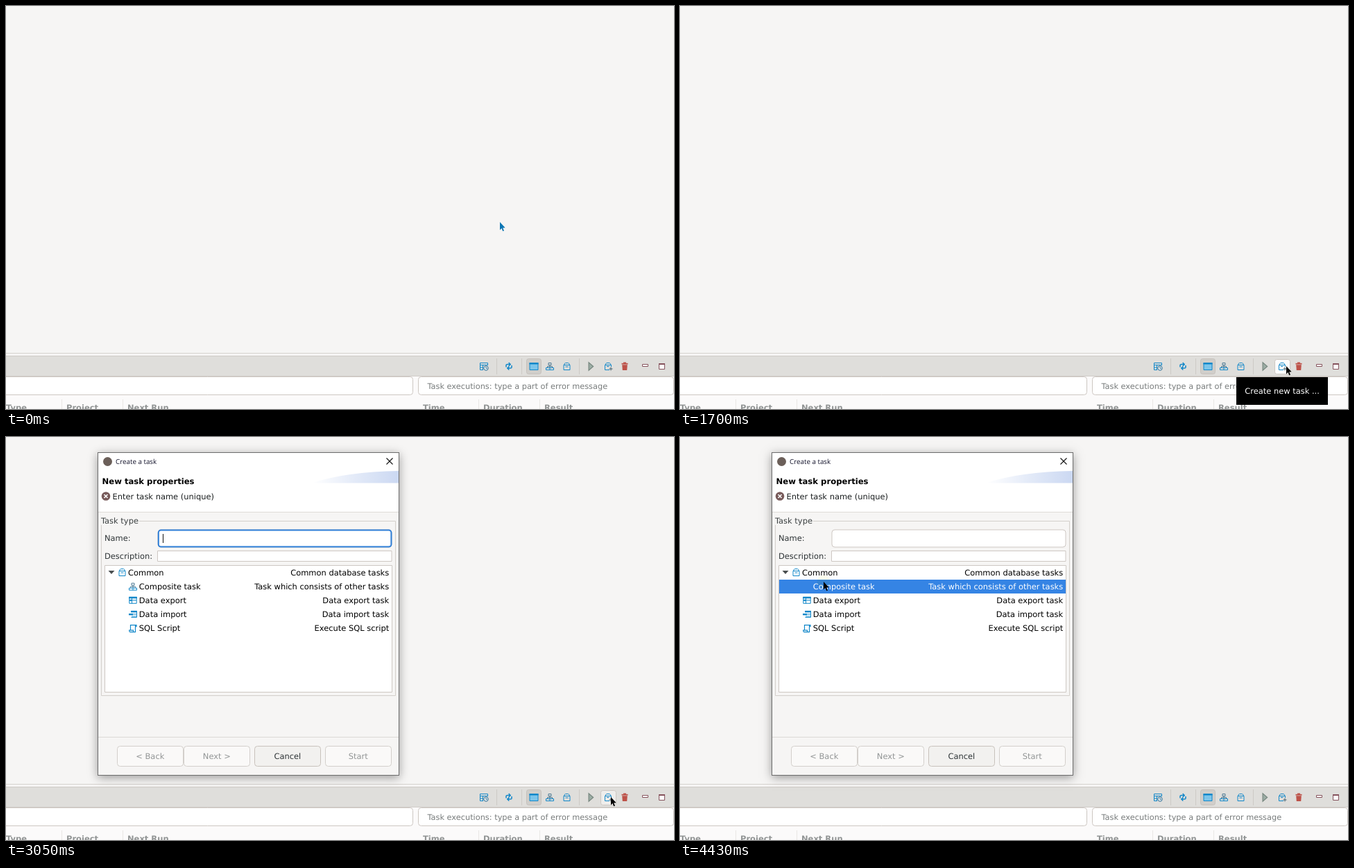
An HTML page with a canvas that plays this animation: 963 px wide and 582 px high, repeating every 5770 ms.

```html
<!DOCTYPE html>
<html lang="en">
<head>
<meta charset="utf-8">
<title>Create a task</title>
<style>
html, body { margin: 0; width: 100%; height: 100%; overflow: hidden; background: #f6f5f4; }
canvas { display: block; }
</style>
</head>
<body>
<canvas id="stage" width="963" height="582"></canvas>
<script>
const ctx = document.getElementById('stage').getContext('2d');
const LOOP = 5770;
const BG = '#f6f5f4', EDGE = '#cdc7c2', INK = '#1b1f20', DIM = '#929595';
const BLUE = '#1187c9', ACCENT = '#3584e4', MAROON = '#85525c';
const SANS = '"DejaVu Sans", sans-serif';

// Pointer path: time, x, y
const PATH = [
  [365, 712, 312], [410, 715, 315], [500, 752, 360], [590, 802, 422], [680, 840, 467],
  [770, 857, 488], [860, 867, 501], [950, 873, 510], [1000, 873, 511], [1200, 873, 516],
  [1460, 874, 520], [2340, 874, 520], [2390, 872, 520], [3140, 872, 520], [3190, 861, 496],
  [3230, 829, 446], [3280, 735, 372], [3325, 560, 300], [3370, 370, 252], [3415, 200, 226],
  [3460, 70, 212], [3505, 5, 208], [3550, -3, 207], [3595, 12, 210], [3640, 48, 216],
  [3685, 95, 222], [3730, 140, 225], [3775, 172, 226], [3820, 190, 226], [3920, 193, 223],
  [4050, 206, 211], [4250, 207, 209]
];

const clamp = v => Math.max(0, Math.min(1, v));
const ramp = (t, from, to) => clamp((t - from) / (to - from));

function pointerAt(t) {
  for (const [from, to] of [[410, 950], [3280, 3820]])
    if (t >= from && t < to) t = from + Math.floor((t - from + 1) / 45) * 45;
  const i = PATH.findIndex(p => p[0] > t);
  if (i === 0) return PATH[0].slice(1);
  if (i < 0) return PATH[PATH.length - 1].slice(1);
  const [a, b] = [PATH[i - 1], PATH[i]];
  const k = ramp(t, a[0], b[0]);
  return [a[1] + (b[1] - a[1]) * k, a[2] + (b[2] - a[2]) * k];
}

function rect(x, y, w, h, color) {
  ctx.fillStyle = color;
  ctx.fillRect(x, y, w, h);
}

function box(x, y, w, h, r, fill, stroke, width = 1) {
  ctx.beginPath();
  ctx.roundRect(x, y, w, h, r);
  if (fill) { ctx.fillStyle = fill; ctx.fill(); }
  if (stroke) { ctx.strokeStyle = stroke; ctx.lineWidth = width; ctx.stroke(); }
}

function poly(points, fill) {
  ctx.beginPath();
  points.forEach(([x, y]) => ctx.lineTo(x, y));
  ctx.closePath();
  ctx.fillStyle = fill;
  ctx.fill();
}

function path(d, stroke, width = 1) {
  ctx.strokeStyle = stroke;
  ctx.lineWidth = width;
  ctx.stroke(new Path2D(d));
}

function disc(x, y, r, color) {
  ctx.beginPath();
  ctx.arc(x, y, r, 0, Math.PI * 2);
  ctx.fillStyle = color;
  ctx.fill();
}

function text(s, x, y, color = INK, font = '11.46px ' + SANS, align = 'left') {
  ctx.font = font;
  ctx.textAlign = align;
  ctx.fillStyle = color;
  ctx.fillText(s, x, y);
}

function at(x, y, draw) {
  ctx.save();
  ctx.translate(x, y);
  draw();
  ctx.restore();
}

// Icons are drawn in a 12 px cell
const icons = {
  bag() {
    path('M1.5 4.5H10.5V11.5H1.5ZM2 4L3.5 1.5M10 4L8.5 1.5', BLUE);
    path('M4 1.5H8M4 7H8', BLUE);
  },
  bagPlus() {
    path('M8 11.5H1.5V4.5H10.5V7M2 4L3.5 1.5M10 4L8.5 1.5M4 1.5H8M4 6.5H7.5', BLUE);
    path('M7.5 10H12.5M10 7.5V12.5', '#45606e');
  },
  tree() {
    path('M4 1.5H8V4.5H4ZM6 5V8M2.5 8V6.5H9.5V8', '#4b7893');
    path('M.5 8.5H11.5V11.5H.5ZM6 8.5V11.5', BLUE);
  },
  schedule() {
    path('M5 11.5H.5V1.5H11.5V5M.5 4.5H11.5M.5 8H5M4.5 4.5V11.5', BLUE);
    ctx.beginPath();
    ctx.arc(9, 9, 3.2, 0, 7);
    ctx.fillStyle = '#e8eef0';
    ctx.fill();
    ctx.strokeStyle = '#2b6c92';
    ctx.stroke();
    path('M9 7V9.3H10.8', '#2b6c92', .9);
  },
  refresh() {
    path('M2 7.5V4.5Q2 3.5 4 3.5H8M5.7 1L8.2 3.5L5.7 6', BLUE, 1.5);
    path('M10 5V8Q10 9 8 9H4M6.3 6.5L3.8 9L6.3 11.5', BLUE, 1.5);
  },
  window() {
    box(.5, 1.5, 12, 10, 0, '#7cc5ea', BLUE);
    rect(0, 1, 13, 2.5, BLUE);
  },
  trash() {
    rect(1.5, 1.8, 9, 1.8, '#bd5148');
    rect(4, .5, 4, 1.6, '#bd5148');
    poly([[2.2, 4.3], [9.8, 4.3], [9.2, 12], [2.8, 12]], '#bd5148');
  },
  dataOut() {
    path('M.8 1.5H11.2V10.5H.8ZM4.5 2V10.5M5 6H11', BLUE);
    rect(0, 1, 12, 2.4, BLUE);
    rect(1, 5, 3, 2, BLUE);
  },
  dataIn() {
    path('M3.5 1.5H11.5V10.5H3.5M4 6H11.5', BLUE);
    rect(3, 1, 9, 2.4, BLUE);
    rect(0, 5, 6, 2.4, BLUE);
    rect(4, 8.3, 7, 1.4, '#69b9e2');
  },
  script() {
    path('M2.5 8.5V1.5H11V3.5H9.5M9.5 1.5V11.5H2Q.7 11.5 .7 9H6.5V11', BLUE, 1.2);
  }
};
const icon = (name, x, y) => at(x, y, icons[name]);

function drawWorkbench(t) {
  rect(0, 0, 963, 582, BG);
  rect(0, 501, 963, 1, '#d6d2ce');
  rect(0, 505, 963, 31, '#dfdedb');
  rect(0, 505, 963, 1, '#d0ccc8');
  rect(0, 534, 963, 1, '#d0ccc8');
  rect(0, 535, 963, 47, '#fbfafa');

  for (const x of [707, 743, 826]) rect(x, 509, 1, 23, '#cdcac6');
  box(750.5, 509.5, 21, 22, 3, '#d0ceca', '#c6c1bc');

  const hover = ramp(t, 1000, 1200) * (1 - ramp(t, 3190, 3270));
  if (hover > 0) {
    ctx.globalAlpha = hover;
    box(857.5, 510.5, 22, 21, 3, t < 2800 ? '#fcfcfc' : '#eeedeb', EDGE);
    ctx.globalAlpha = 1;
  }

  icon('schedule', 683, 514);
  icon('refresh', 719, 514);
  icon('window', 754.5, 514);
  icon('tree', 778, 514);
  icon('bag', 802.5, 514);
  poly([[839.5, 513.5], [847.5, 520.5], [839.5, 527.5]], '#74847d');
  poly([[840.6, 516], [845.8, 520.5], [840.6, 525]], '#9cada4');
  icon('bagPlus', 862, 514);
  icon('trash', 886, 514);
  box(917.5, 517.5, 8, 3, 0, '#fff', MAROON);
  box(941.5, 516.5, 8, 8, 0, '#fff', MAROON);
  rect(941, 516, 9, 2, MAROON);

  box(-8, 535.5, 594.5, 26, 4, '#fff', EDGE);
  box(594.5, 535.5, 368, 26, 4, '#fff', EDGE);
  text('Task executions: type a part of error message', 607.5, 552.5, '#787c7c', '11.35px ' + SANS);

  for (const x of [80, 168, 681, 769]) rect(x, 568, 1, 14, '#e9e7e5');
  const heads = { Type: 0, Project: 87, 'Next Run': 175, Time: 601, Duration: 688, Result: 776 };
  for (const s in heads) text(s, heads[s], 583.7, '#929595', 'bold 11.5px ' + SANS);
}

function drawFrame() {
  ctx.save();
  ctx.shadowColor = 'rgba(0,0,0,.38)';
  ctx.shadowBlur = 13;
  ctx.shadowOffsetY = 3;
  rect(132, 22, 435, 467, '#6c6c6c');
  ctx.restore();
  rect(133, 23, 433, 465, BG);
  rect(133, 23, 433, 26, '#fff');
  disc(146.5, 35.5, 6.5, '#6b5f59');
  text('Create a task', 158, 39.3, '#14142c', '9.8px "Open Sans", sans-serif');
  path('M548.5 30.5L557.5 39.5M557.5 30.5L548.5 39.5', '#111', 1.1);
}

function drawHeader() {
  rect(133, 49, 433, 59, '#fff');
  rect(133, 108, 433, 1, '#dedbd8');
  const g = ctx.createLinearGradient(441, 0, 566, 0);
  g.addColorStop(0, '#ffffff');
  g.addColorStop(.5, '#e3eaf8');
  g.addColorStop(1, '#cbd8f2');
  ctx.fillStyle = g;
  ctx.fill(new Path2D('M441 66.5Q490 50 566 49V66.5Z'));
  text('New task properties', 138.5, 67.5, '#000', 'bold 11.65px ' + SANS);
  disc(144, 85.5, 6.3, '#775a5a');
  path('M141.5 83L146.5 88M146.5 83L141.5 88', '#fff', 1.6);
  text('Enter task name (unique)', 153.5, 89.5);
}

function drawTree(picked) {
  box(142.5, 185.5, 414, 183, 0, '#fff', EDGE);
  if (picked) rect(143, 206, 413, 20, ACCENT);
  poly([[147.5, 193], [156.5, 193], [152, 198]], '#4a4f50');
  icon('bag', 161.5, 189);
  const rows = [
    ['Common', 'Common database tasks'],
    ['Composite task', 'Task which consists of other tasks', 'tree'],
    ['Data export', 'Data export task', 'dataOut'],
    ['Data import', 'Data import task', 'dataIn'],
    ['SQL Script', 'Execute SQL script', 'script']
  ];
  rows.forEach(([name, note, glyph], i) => {
    const y = 199.5 + i * 20.15;
    const on = picked && i === 1;
    const color = on ? '#fff' : '#000';
    if (glyph && !on) icon(glyph, 177, y - 10);
    text(name, i ? 191.8 : 176, y, color);
    text(note, 552.2, y, color, undefined, 'right');
  });
}

function drawForm(t) {
  const picked = t >= 4290;
  const focus = 1 - ramp(t, 4250, 4430);
  drawHeader();

  path('M192 121.5H561.5V373.5H137.5V127', '#d3cfcb');
  text('Task type', 137, 125, '#3c4142');
  text('Name:', 142, 150, '#2e3436');
  text('Description:', 142, 175.7, '#2e3436');
  box(219, 134, 337, 25, 4, '#fff', EDGE);
  if (focus > 0) {
    ctx.globalAlpha = focus;
    box(219.8, 134.6, 335.6, 24, 3.5, null, '#2f7fd8', 2);
    ctx.globalAlpha = 1;
  }
  const caretOn = t < 3650 || (t >= 4050 && t < 4250);
  if (caretOn) rect(226, 140, 1, 13, '#111');
  box(218.5, 164.5, 337.5, 15, 0, '#fff', EDGE);
  drawTree(picked);

  rect(133, 433, 433, 1, '#dcd9d6');
  const buttons = [['< Back', 160.5], ['Next >', 256.5], ['Cancel', 358.5], ['Start', 460.5]];
  for (const [label, x] of buttons) {
    const live = label === 'Cancel';
    box(x, 446.5, 95, 29, 4, live ? '#f2f1ef' : '#faf9f8', live ? '#c8c2bc' : '#d3cfcb');
    text(label, x + 47.3, 464.6, live ? '#2e3436' : DIM, undefined, 'center');
  }
}

function drawClick(t, start, x, y) {
  const k = ramp(t, start, start + 190);
  if (t < start || k >= 1) return;
  ctx.save();
  ctx.globalCompositeOperation = 'multiply';
  ctx.globalAlpha = 1 - k * k;
  disc(x, y, 9.5, '#fdf43c');
  ctx.restore();
}

function drawPointer(t) {
  const [x, y] = pointerAt(t);
  at(x, y, () => poly(
    [[0, 0], [0, 11.4], [2.5, 9], [4.2, 13.2], [6, 12.5], [4.2, 8.4], [7.6, 8.2]],
    t < 410 ? '#0d76b4' : '#000'));
}

function draw(t) {
  drawWorkbench(t);
  if (t >= 1700 && t < 2670) {
    rect(802, 536, 132, 40, '#000');
    text('Create new task ...', 814.2, 560, '#fff');
  }
  if (t >= 2855) drawFrame();
  if (t >= 3050) drawForm(t);
  drawClick(t, 2670, 870, 520);
  drawClick(t, 4250, 207, 209);
  drawPointer(t);
}

ctx.textRendering = 'geometricPrecision';
const start = performance.now();
function tick() {
  draw((performance.now() - start) % LOOP);
  requestAnimationFrame(tick);
}
tick();
</script>
</body>
</html>
```
